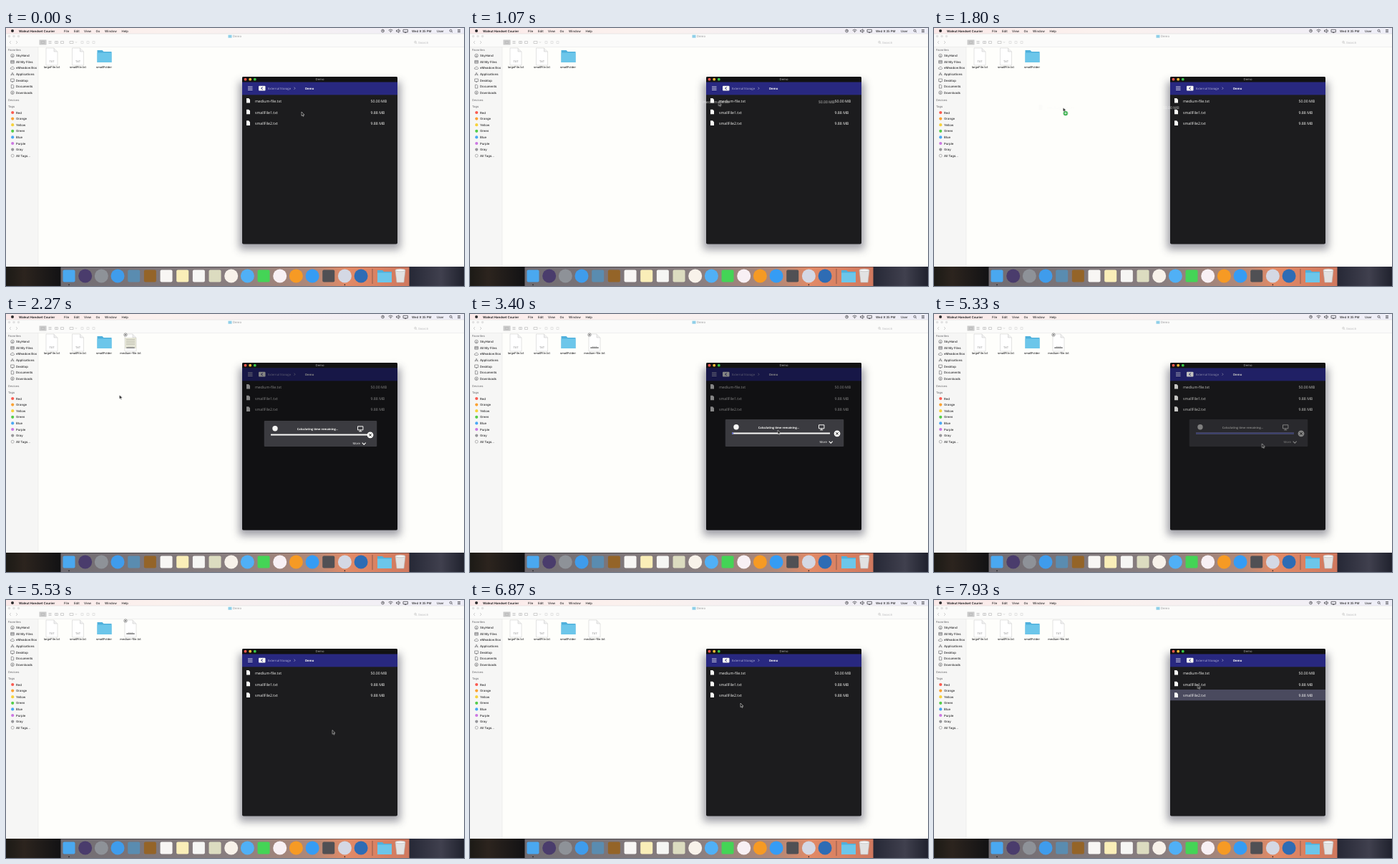
An HTML page for the animation above (8 s loop, 640 px wide and 360 px high).

```html
<!DOCTYPE html>
<html lang="en">
<head>
<meta charset="utf-8">
<title>File transfer</title>
<style>
html, body { margin: 0; width: 100%; height: 100%; overflow: hidden; background: #fefefb; }
svg { display: block; width: 100vw; height: 100vh; }
text { font-family: Inter, "Open Sans", sans-serif; font-size: 4.3px; font-weight: 500; fill: #2a2a2c; text-rendering: geometricPrecision; }
.app text { font-family: "Open Sans", "Noto Sans", sans-serif; font-size: 5.2px; font-weight: 500; fill: #fbfbf8; }
.app .small { font-size: 4.2px; }
.app .bold { font-size: 4.2px; font-weight: 700; }
.label { font-size: 4px; text-anchor: middle; }
.mid { text-anchor: middle; }
.head { font-size: 4px; fill: #77777a; }

.anim { animation: 8s linear infinite; }
.toggle { animation-timing-function: step-end; opacity: 0; }
#pointer { animation-name: pointer; }
#ghost { animation-name: ghost; }
#plus { animation-name: plus; }
#copy { animation-name: copy; }
#wash { animation-name: wash; }
#badge { animation-name: badge; }
#modal { animation-name: modal; opacity: 0; }
#panel { animation-name: panel; transform-origin: 439.5px 185px; }
#left { animation-name: left; }
#right { animation-name: right; }
#done { animation-name: done; transform-origin: 370px 0; }
#picked { animation-name: picked; }

@keyframes pointer {
  0% { transform: translate(413px, 117px); animation-timing-function: ease-in-out; }
  8%, 10.5% { transform: translate(370px, 102px); animation-timing-function: ease-in-out; }
  22.5% { transform: translate(180.5px, 111px); animation-timing-function: ease-out; }
  27%, 29.5% { transform: translate(158.5px, 113px); animation-timing-function: ease-in-out; }
  48%, 56% { transform: translate(491px, 173px); animation-timing-function: ease-in-out; }
  69%, 70% { transform: translate(456px, 181.5px); animation-timing-function: ease-in-out; }
  85.9% { transform: translate(378px, 144px); animation-timing-function: ease-out; }
  91%, 94% { transform: translate(371px, 131px); animation-timing-function: ease-in-out; }
  99%, 100% { transform: translate(368.5px, 118px); }
}
@keyframes ghost { 0% { opacity: 0; } 11.5% { opacity: .8; } 25.4%, 100% { opacity: 0; } }
@keyframes plus { 0% { opacity: 0; } 15.5% { opacity: 1; } 25.4%, 100% { opacity: 0; } }
@keyframes copy { 0% { opacity: 0; } 26.25%, 100% { opacity: 1; } }
@keyframes wash { 0% { opacity: 0; } 26.25% { opacity: 1; } 33.75%, 100% { opacity: 0; } }
@keyframes badge { 0% { opacity: 0; } 26.25% { opacity: 1; } 71.25%, 100% { opacity: 0; } }
@keyframes modal { 0%, 26.2% { opacity: 0; } 27.9%, 65.6% { opacity: 1; } 67.5%, 100% { opacity: 0; } }
@keyframes panel { 0%, 28.5% { transform: none; } 30.5%, 100% { transform: scale(1.05, 1.056); } }
@keyframes left { 0%, 28.5% { transform: none; } 30.5%, 100% { transform: translate(-4px, -2px); } }
@keyframes right { 0%, 28.5% { transform: none; } 30.5%, 100% { transform: translate(4px, -2px); } }
@keyframes done {
  0%, 42% { transform: scaleX(0); }
  55.9% { transform: scaleX(.43); }
  65%, 100% { transform: scaleX(1); }
}
@keyframes picked { 0% { opacity: 0; } 92.5%, 100% { opacity: 1; } }
</style>
</head>
<body>
<svg viewBox="0 0 640 360" preserveAspectRatio="none">
  <defs>
    <filter id="soft" x="-20%" y="-20%" width="140%" height="140%"><feGaussianBlur stdDeviation="6"/></filter>
    <linearGradient id="wall">
      <stop offset="0" stop-color="#1c1a16"/><stop offset=".04" stop-color="#2c241e"/>
      <stop offset=".12" stop-color="#121214"/><stop offset=".88" stop-color="#262836"/>
      <stop offset=".95" stop-color="#40404e"/><stop offset="1" stop-color="#20222e"/>
    </linearGradient>
    <linearGradient id="shelf">
      <stop offset="0" stop-color="#706c72"/><stop offset=".5" stop-color="#8a7f80"/>
      <stop offset=".72" stop-color="#b08878"/><stop offset=".82" stop-color="#e28a66"/>
      <stop offset="1" stop-color="#d0785e"/>
    </linearGradient>
    <linearGradient id="bar">
      <stop offset="0" stop-color="#fbe9e9"/><stop offset=".35" stop-color="#fbf1ee"/><stop offset="1" stop-color="#eeeef8"/>
    </linearGradient>
    <g id="page">
      <path d="M-8 0H3L8 5V24H-8Z" fill="#fff" stroke="#d0d0d0" stroke-width=".6"/>
      <path d="M3 0V5H8" fill="#efefef" stroke="#c4c4c4" stroke-width=".5"/>
      <text y="19.5" class="mid" style="font-size:3.6px;fill:#88888a">TXT</text>
    </g>
    <path id="sheet" d="M0 0H3.2L5 1.9V6.6H0Z" fill="#fafaf8"/>
    <g id="folder">
      <path d="M-10-8H-3L-1-6H10V9H-10Z" fill="#4fb0dc"/>
      <path d="M-10-4.5H10V9H-10Z" fill="#6cc6ea"/>
    </g>
  </defs>

  <rect width="640" height="360" fill="#fefefb"/>
  <rect y="8" width="640" height="18.5" fill="#fbfbfa"/>
  <rect y="26.5" width="45" height="307" fill="#f6f6f5"/>
  <path d="M0 26.5H640M45 26.5V333" stroke="#e0e0e0" stroke-width=".5"/>
  <rect width="640" height="8" fill="url(#bar)"/>
  <path d="M0 8H640" stroke="#d4d4d6" stroke-width=".5"/>
  <g id="menu"></g>

  <g id="toolbar" fill="none" stroke="#b4b4b4" stroke-width=".6">
    <g fill="#e2e2e2" stroke="none">
      <circle cx="4.5" cy="11.5" r="1.8"/><circle cx="11" cy="11.5" r="1.8"/><circle cx="17.5" cy="11.5" r="1.8"/>
      <rect x="46.5" y="16.5" width="10" height="7" fill="#cacaca"/>
      <rect x="310.5" y="9.7" width="5" height="4" fill="#8fcfe8"/>
    </g>
    <path d="M7 18L5 20L7 22M14 18L16 20L14 22"/>
    <path d="M49.5 18.5h4v3h-4zM59.5 18.5h4m-4 1.5h4m-4 1.5h4M68.5 18.5h4v3h-4zm2 0v3M76.5 18.5h4v3h-4z"/>
    <path d="M89 18.5h5v3h-5zM97 19.4l1 1 1-1"/>
    <path d="M105 18.5h3v3h-3zM113 18.5h3v3h-3zM121 18.5h3v3h-3z" stroke="#d4d4d4"/>
    <circle cx="572" cy="19.7" r="1.3"/><path d="M573 20.7l1.2 1.2"/>
  </g>
  <text x="317" y="13" style="fill:#a4a4a6">Demo</text>
  <text x="576" y="21.5" style="fill:#c4c4c6">Search</text>

  <g id="sidebar"></g>
  <g id="files"></g>
  <g id="copy" class="anim toggle">
    <use href="#page" x="174" y="28"/>
    <text x="174" y="56" class="label">medium-file.txt</text>
    <g id="wash" class="anim toggle">
      <rect x="166" y="33" width="16" height="15" fill="#dcdcc8" opacity=".75"/>
      <path d="M168 36h12m-12 3h12m-12 3h12" stroke="#a8a898" stroke-width=".7"/>
    </g>
    <g id="badge" class="anim toggle">
      <circle cx="167" cy="29" r="2.2" fill="#fff" stroke="#555" stroke-width=".6"/>
      <path d="M166.1 28.1l1.8 1.8m0-1.8l-1.8 1.8" stroke="#333" stroke-width=".6"/>
      <rect x="168" y="46.2" width="12" height="1.8" rx=".9" fill="#8c8c8c"/>
    </g>
  </g>

  <rect x="326" y="75" width="225" height="234" fill="#3c3c50" opacity=".5" filter="url(#soft)"/>
  <g class="app">
    <rect x="330" y="68" width="217" height="233.5" rx="2" fill="#1c1c1e"/>
    <path d="M330 75.5V70a2 2 0 0 1 2-2H545a2 2 0 0 1 2 2V75.5Z" fill="#121213"/>
    <circle cx="334.5" cy="71.7" r="1.9" fill="#f9564c"/>
    <circle cx="341.2" cy="71.7" r="1.9" fill="#f9bc36"/>
    <circle cx="347.8" cy="71.7" r="1.9" fill="#38c848"/>
    <text x="438.5" y="73.4" class="small mid" style="fill:#b8b8b8">Demo</text>
    <rect x="330" y="75.5" width="217" height="17.8" fill="#282880"/>
    <path d="M338 82h6.5m-6.5 2.2h6.5m-6.5 2.2h6.5" stroke="#d8d8e8" stroke-width=".9"/>
    <rect x="353" y="80.8" width="9.5" height="6.8" rx="1" fill="#f8f8f4"/>
    <path d="M358.7 82.5L356.6 84.2L358.7 85.9" fill="none" stroke="#282880"/>
    <text x="366" y="85.8" class="small" style="fill:#b8b8d8">External Storage</text>
    <path d="M402.5 82.6l1.6 1.6-1.6 1.6" fill="none" stroke="#c8c8e0" stroke-width=".6"/>
    <text x="418" y="85.8" class="bold">Demo</text>
    <rect id="picked" class="anim toggle" x="330" y="125" width="217" height="15.2" fill="#4a4a5e"/>
    <g id="rows"></g>

    <g id="modal" class="anim">
      <rect x="330" y="75.5" width="217" height="226" rx="1" fill="#080809" opacity=".48"/>
      <rect id="panel" class="anim" x="360.7" y="149" width="157.6" height="36" rx="1" fill="#3b3b40"/>
      <g id="left" class="anim">
        <circle cx="376" cy="159.8" r="3.7" fill="#f8f8f6"/>
        <text x="435.5" y="162.2" class="bold mid" style="font-size:4px">Calculating time remaining...</text>
        <path d="M491.5 156.8h7.4v5h-7.4zM495.2 162v1.6m-2 .2h4" fill="none" stroke="#f8f8f6" stroke-width="1"/>
        <rect x="370" y="167.5" width="137" height="2" fill="#fafaf8"/>
        <rect id="done" class="anim" x="370" y="167.5" width="137" height="2" fill="#5a62d0"/>
      </g>
      <g id="right" class="anim">
        <circle cx="509" cy="168.8" r="4.4" fill="#fcfcfa"/>
        <path d="M507.3 167.1l3.4 3.4m0-3.4l-3.4 3.4" stroke="#222" stroke-width="1"/>
        <text x="484.5" y="182.3" class="small">More</text>
        <path d="M497.7 179.7l2.5 2.5 2.5-2.5" fill="none" stroke="#f8f8f6" stroke-width="1.1"/>
      </g>
    </g>
  </g>

  <rect y="333" width="640" height="27" fill="url(#wall)"/>
  <rect x="76.5" y="333.5" width="487" height="26.5" fill="url(#shelf)"/>
  <g id="dock"></g>
  <path d="M512 336V357" stroke="#6a4a44" stroke-width=".7"/>
  <use href="#folder" x="529" y="346"/>
  <g stroke="#b8b8b8" stroke-width=".6">
    <path d="M544 338H558L556 355H546Z" fill="#e2e2e2"/>
    <ellipse cx="551" cy="338" rx="7" ry="1.8" fill="#f6f6f6"/>
  </g>

  <g id="pointer" class="anim">
    <g id="ghost" class="anim toggle app"></g>
    <path d="M0 0V5.6L1.3 4.4L2.2 6.4L3.1 6L2.3 4.1H4Z" fill="#111" stroke="#fafafa" stroke-width=".5"/>
    <g id="plus" class="anim toggle">
      <circle cx="3.4" cy="8" r="3.1" fill="#24a83a"/>
      <path d="M1.6 8h3.6M3.4 6.2v3.6" stroke="#fff" stroke-width=".9"/>
    </g>
  </g>
</svg>
<script>
const fill = (id, parts) => { document.getElementById(id).innerHTML = parts.join(''); };
const label = (x, y, text, extra = '') => `<text x="${x}" y="${y}" ${extra}>${text}</text>`;

const menus = [['File', 81], ['Edit', 95], ['View', 109], ['Go', 125.5], ['Window', 138], ['Help', 161.5]];
fill('menu', [
  '<circle cx="9" cy="4" r="2" fill="#2a2a2c"/>',
  label(18, 5.5, 'Walnut Handset Courier', 'style="font-weight:700"'),
  ...menus.map(([name, x]) => label(x, 5.5, name)),
  `<g fill="none" stroke="#333338" stroke-width=".7">
    <circle cx="526.5" cy="4" r="1.9"/><path d="M526.5 2.8V4H527.5"/>
    <path d="M534.5 3.2q3-2.4 6 0M535.8 4.6q1.7-1.3 3.4 0"/><circle cx="537.5" cy="5.7" r=".3"/>
    <path d="M545.5 3.2h1.5l1.8-1.5v4.8l-1.8-1.5h-1.5zM550 2.6q1 1.4 0 2.8"/>
    <path d="M555 2.3h6.4v3.4H555zM557 6.4h2.4"/>
    <circle cx="621.5" cy="3.7" r="1.5"/><path d="M622.6 4.8l1.4 1.4M631 2.5h4m-4 1.6h4m-4 1.6h4"/>
  </g>`,
  label(567, 5.5, 'Wed 9:35 PM'),
  label(602, 5.5, 'User')
]);

const step = 8.6;
const places = ['SkyHand', 'All My Files', 'eMeadow Box', 'Applications', 'Desktop', 'Documents', 'Downloads'];
const glyphs = [
  '<circle r="2.3"/><path d="M0 2V0M-1.2 1L0-.3 1.2 1"/>',
  '<path d="M-2.3-1.8h4.6v3.8h-4.6zm0 1.3h4.6m-4.6 1.2h4.6"/>',
  '<path d="M-1.8 1.6H1.8A1.2 1.2 0 0 0 1.8-.6A1.8 1.8 0 0 0-1.5-.6A1.1 1.1 0 0 0-1.8 1.6Z"/>',
  '<path d="M-2 2L0-2.2 2 2M-2.4.6H2.4"/>',
  '<path d="M-2.4-2h4.8v3.6h-4.8zM-1 2.4H1"/>',
  '<path d="M-1.7-2.4H.7l1 1V2.4h-3.4z"/>',
  '<circle r="2.3"/><path d="M0-1.3V1.2M-1 .2L0 1.2 1 .2"/>'
];
const tags = { Red: '#fb5a50', Orange: '#fba234', Yellow: '#f7d23c', Green: '#55cd4a', Blue: '#4aa8f4', Purple: '#cc78e2', Gray: '#98989c' };
const tagTop = 118;
fill('sidebar', [
  label(3, 32.3, 'Favorites', 'class="head"'),
  ...places.map((name, i) => {
    const y = 38.6 + i * step;
    return `<g transform="translate(9 ${y})" fill="none" stroke="#606064" stroke-width=".6">${glyphs[i]}</g>` + label(14, y + 1.5, name);
  }),
  label(3, 102.3, 'Devices', 'class="head"'),
  label(3, 111.3, 'Tags', 'class="head"'),
  ...Object.entries(tags).map(([name, color], i) =>
    `<circle cx="9.2" cy="${tagTop + i * step}" r="2.1" fill="${color}"/>` + label(14, tagTop + 1.5 + i * step, name)),
  '<circle cx="9.2" cy="178.2" r="2" fill="none" stroke="#88888a" stroke-width=".6"/>',
  label(14, 179.7, 'All Tags...')
]);

fill('files', [
  '<use href="#page" x="64" y="28"/><use href="#page" x="100.5" y="28"/><use href="#folder" x="137.5" y="39"/>',
  ...['largeFile.txt', 'smallFile.txt', 'smallFolder'].map((name, i) => label(64 + i * 36.5, 56, name, 'class="label"'))
]);

const row = (name, size, y) =>
  `<use href="#sheet" x="336" y="${y - 4}"/>` + label(348, y + 1.9, name) + label(509.5, y + 1.9, size);
fill('rows', [
  row('medium-file.txt', '50.00 MB', 102),
  row('smallFile1.txt', '9.88 MB', 117.7),
  row('smallFile2.txt', '9.88 MB', 133.3)
]);
fill('ghost', [`<g transform="translate(-370 -102)">${row('medium-file.txt', '50.00 MB', 102)}</g>`]);

// Each dock item: shape (o round, s square) and colour.
const dock = ['s#4aa8f0', 'o#4a3c6c', 'o#8e9298', 'o#3f9cec', 's#5a8cb0', 's#946428', 's#f8f6f4', 's#faeeb8', 's#f6f6f4', 's#dcdcc0',
  'o#f8f2ea', 'o#50b0f6', 's#44d456', 'o#f8f0f4', 'o#f69a24', 'o#359cf4', 's#505054', 'o#d4d8e4', 'o#2e6cb4'];
const gap = 22.67, first = 88;
fill('dock', [
  ...dock.map((item, i) => {
    const x = first + i * gap, color = item.slice(1);
    return item[0] === 'o'
      ? `<circle cx="${x}" cy="346" r="9.5" fill="${color}"/>`
      : `<rect x="${x - 8.5}" y="337.5" width="17" height="17" rx="2" fill="${color}"/>`;
  }),
  ...[0, 17].map(i => `<circle cx="${first + i * gap}" cy="358.3" r=".8" fill="#111113"/>`)
]);
</script>
</body>
</html>
```
